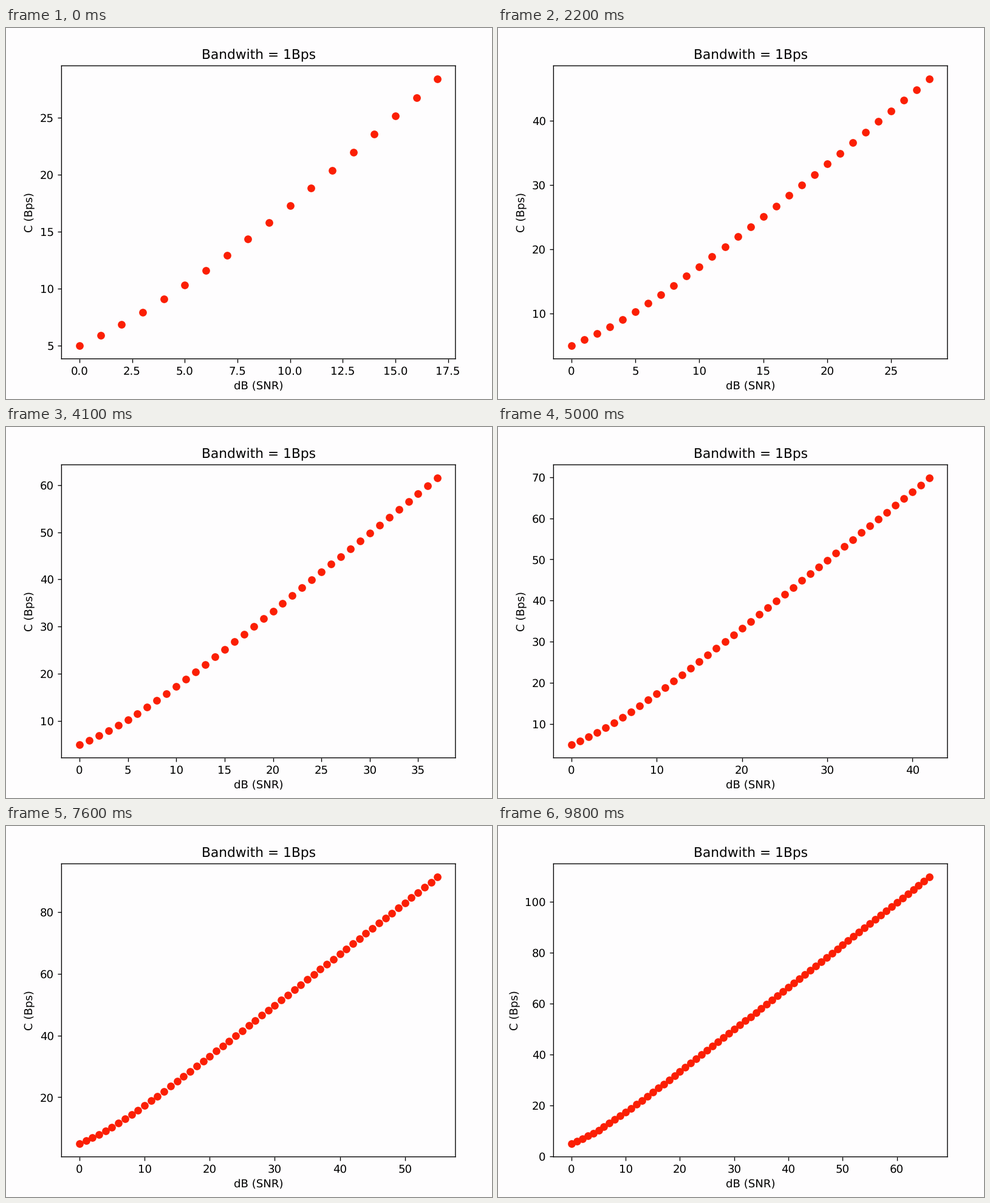
Write a matplotlib script that moves like this. It is 800x612 px and loops after 10000 ms.

```python
import numpy as np
import matplotlib.pyplot as plt
from matplotlib.animation import FuncAnimation

W, H, DPI = 800, 612, 130.75
LEFT, RIGHT, TOP, BOTTOM = 91.4, 739.8, 62.4, 545.7
FIRST, STEPS, STEP_MS = 17, 50, 200
BANDWIDTH = 5
PAPER, RED = "#fefdfe", "#fb1f04"
LINE = 0.75

plt.rcParams.update({
    "font.family": "DejaVu Sans",
    "text.hinting": "none",
    "axes.linewidth": LINE,
    "xtick.major.width": LINE,
    "ytick.major.width": LINE,
    "path.snap": False,  # keep lines and dots at fractional pixels
})


def capacity(db):
    """Shannon capacity for a signal-to-noise ratio in decibels."""
    return BANDWIDTH * np.log2(1 + 10 ** (db / 10))


# The tiny surplus keeps the canvas from rounding down a pixel.
fig = plt.figure(figsize=((W + 0.01) / DPI, (H + 0.01) / DPI), dpi=DPI,
                 facecolor=PAPER)
ax = fig.add_axes([LEFT / W, 1 - BOTTOM / H,
                   (RIGHT - LEFT) / W, (BOTTOM - TOP) / H], facecolor=PAPER)
ax.set_title("Bandwith = 1Bps")
ax.set_xlabel("dB (SNR)")
ax.set_ylabel("C (Bps)")
dots, = ax.plot([], [], "o", color=RED, markersize=6)


def update(step):
    db = np.arange(FIRST + step + 1)
    dots.set_data(db, capacity(db))
    ax.relim()
    ax.autoscale_view()
    return dots,


anim = FuncAnimation(fig, update, frames=STEPS, interval=STEP_MS,
                     repeat=True, repeat_delay=0, blit=False)
plt.show()
```
